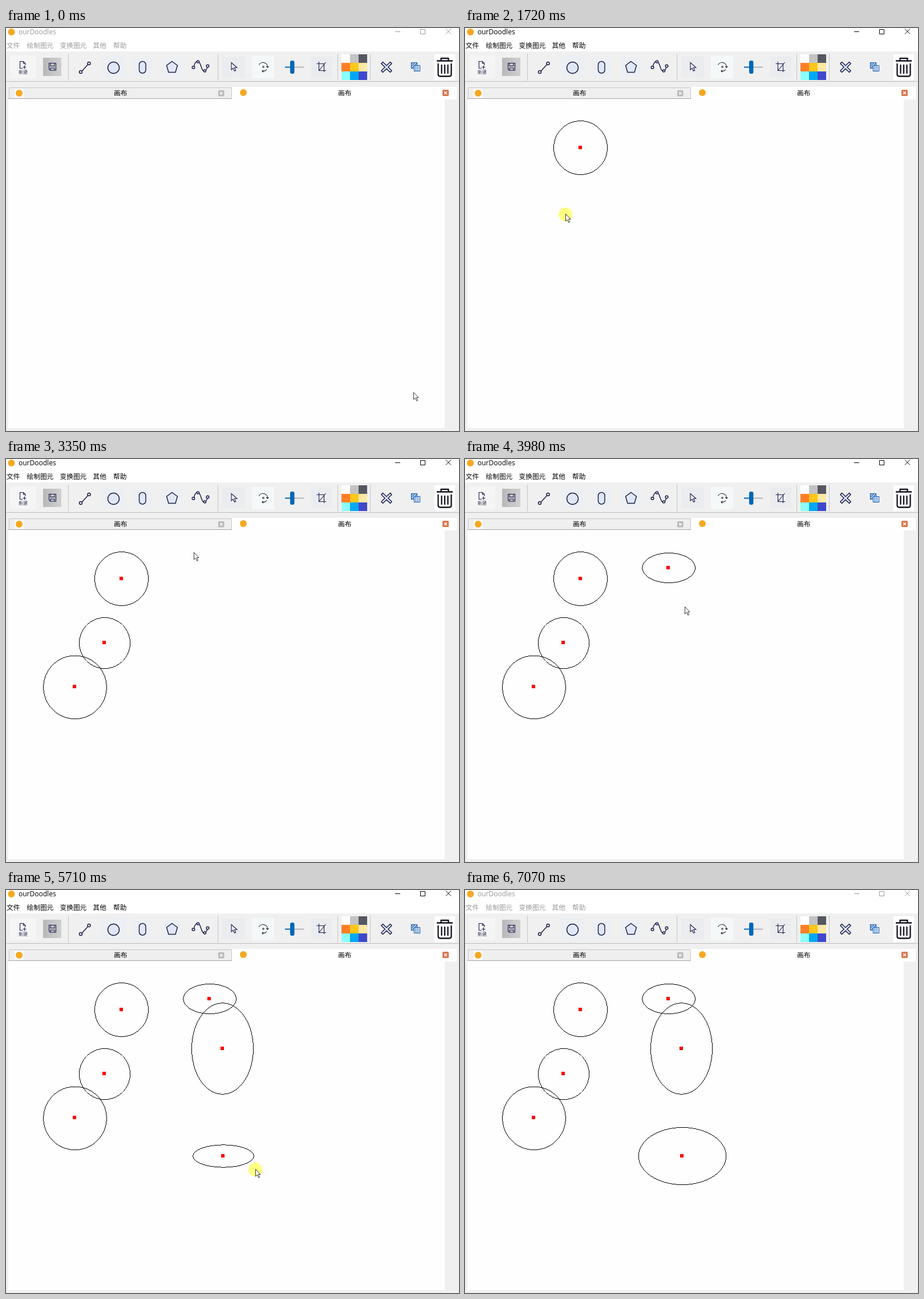
These frames come from a looping animation (794x705 px, 7.15 s). An HTML page:

```html
<!DOCTYPE html>
<html lang="zh">
<head>
<meta charset="utf-8">
<title>ourDoodles</title>
<style>
html, body { margin: 0; width: 100%; height: 100%; overflow: hidden; background: #f0f0f0; }
svg { display: block; }
text { font: 11.7px "Noto Sans CJK SC", "Noto Sans CJK", sans-serif; }
.name { font: 12px "Open Sans", sans-serif; }
#bar { color: #999; fill: currentColor; }
#bar.on { color: #000; }
.logo { fill: #f6a821; }
.ink { fill: none; stroke: #1d1f4e; stroke-width: 1.5; }
.soft { fill: #e0e8f8; }
.thin { stroke-width: 1.1; }
#art, #palette { shape-rendering: crispEdges; }
#art rect { fill: #f00; }
#hover { fill: #d8e6f2; stroke: #c0dcf3; }
</style>
</head>
<body>
<svg width="794" height="705" viewBox="0 0 794 705">
  <defs>
    <linearGradient id="steel"><stop stop-color="#b8b8ba"/><stop offset="1" stop-color="#d0d0d2"/></linearGradient>
    <pattern id="hatch" width="3" height="3" patternUnits="userSpaceOnUse" patternTransform="rotate(45)">
      <path d="M.8 0V3" stroke="#1f63b5" stroke-width="1.5"/>
    </pattern>
  </defs>
  <path d="M0 0H794V41H0Z" fill="#fff"/>

  <g id="bar">
    <text class="name" x="22" y="11">ourDoodles</text>
    <text x="1" y="35">文件</text>
    <text x="36.5" y="35">绘制图元</text>
    <text x="94.5" y="35">变换图元</text>
    <text x="152.5" y="35">其他</text>
    <text x="188" y="35">帮助</text>
    <g fill="none" stroke="currentColor">
      <path d="M682 6.5h9M726.5 2.5h8v8h-8Z"/>
      <path d="M771 1.5l9 9M780 1.5l-9 9"/>
    </g>
  </g>
  <circle class="logo" cx="9.5" cy="7" r="6"/>

  <path d="M0 93.5H794" stroke="#bcbcbc"/>
  <path d="M109.5 45V92M371.5 45V92M581.5 45V92M638.5 45V92" stroke="#c4c4c4"/>
  <rect id="hover" y="43.5" width="50" height="49"/>
  <path d="M7 48h46v40H7Z" fill="#f5f5f5"/>
  <path d="M65 52h32v32H65Z" fill="url(#steel)"/>
  <path d="M168 49h42v38h-42ZM222 52h34v34h-34ZM274 52h34v34h-34Z" fill="#ecf0f4"/>
  <path d="M379 50h40v36h-40ZM535 50h37v36h-37Z" fill="#ebecef"/>
  <path d="M431 49h39v39h-39Z" fill="#f5f8f8"/>
  <path d="M751 46h36v45h-36Z" fill="#fff"/>

  <g class="ink thin">
    <path d="M29 70.5h-4.500V58.5h6l3.500 3.500v3M30.5 58.500V62H34M29.500 68.500h6M32.500 65.500v6"/>
    <path d="M75.500 61.500h12v12.500h-10l-2-2ZM78 61.500v5h7v-5M78 74v-4h7v4"/>
  </g>
  <text x="22" y="80" style="font-size:8px" fill="#34365c">新建</text>
  <g class="ink">
    <path d="M133 75.500L143.500 64"/>
    <circle cx="131" cy="77" r="2.500"/><circle cx="145.500" cy="62" r="2.500"/>
    <circle class="soft" cx="188.500" cy="69.500" r="10"/>
    <rect class="soft" x="233.500" y="58.500" width="11.500" height="20.500" rx="5.500"/>
    <path class="soft" d="M291 58.500L300.500 65.500L297 77.500H285L281.500 65.500Z"/>
    <path d="M329.500 66.500C331 60 334 57.500 337 58.500C342 60 342 75 347 75.500C351 76 352 71 353 68"/>
    <g class="soft"><circle cx="328.500" cy="69" r="2.300"/><circle cx="336.500" cy="59" r="2"/><circle cx="348.500" cy="75" r="2"/><circle cx="353.500" cy="66.500" r="2.300"/></g>
  </g>
  <path class="ink thin" d="M395 60.500V73l3.200-2.700 2.300 5 2.300-1-2.300-5H405Z"/>
  <g fill="none" stroke="#22242e" stroke-width="1.100">
    <path d="M443.500 64.500A8 8 0 0 1 458.500 69M456.300 67l2.200 2.200 2-2.200M457 72.500A8 8 0 0 1 449 75.500M451 73.500l-2 2 2 1.800"/>
    <circle cx="451" cy="68" r="1.200"/>
  </g>
  <path d="M505 68.500H522" stroke="#b4b4b4" stroke-width="2"/>
  <path d="M489 68.500H500" stroke="#0067b8" stroke-width="2"/>
  <rect x="498" y="57" width="7.500" height="23" rx="3" fill="#0067b8"/>
  <path class="ink thin" d="M548.500 59V74.500H561M544.500 62.500H557.500V77M548.500 74.500L560.500 60"/>
  <g id="palette"></g>
  <path class="ink soft" stroke-linejoin="round" d="M660.500 59.500L667 65.800L673.500 59.500L676.200 62.200L669.800 68.500L676.200 74.800L673.500 77.500L667 71.200L660.500 77.500L657.800 74.800L664.200 68.500L657.800 62.200Z"/>
  <g stroke="#1f63b5" stroke-width="1.200">
    <path d="M710.500 60.500h10v10h-10Z" fill="url(#hatch)"/>
    <path d="M715.500 65.500h10v10h-10Z" fill="#eef3fa"/>
    <path d="M718.500 65.500v10M722 65.500v10" fill="none"/>
  </g>
  <g fill="none" stroke="#14121c" stroke-width="2.300" stroke-linejoin="round">
    <path d="M755 57.500H783M762.500 57V53h13v4M757.500 62V81q0 3.500 3.500 3.500h16q3.500 0 3.500-3.500V62"/>
    <path d="M763.500 65V79M769 65V79M774.500 65V79" stroke-linecap="round"/>
  </g>

  <path d="M5.500 123.500V104.500H395.500V123.500" fill="#efefef" stroke="#c6c6c6"/>
  <path d="M396 103H790V125H396Z" fill="#fff"/>
  <path d="M4 124H769V700H4Z" fill="#fefefe"/>
  <path d="M4 123.500H396" stroke="#a5a5a5"/>
  <path d="M15 106h16v16H15Z" fill="#fafafa"/>
  <circle class="logo" cx="23" cy="114" r="6"/>
  <circle class="logo" cx="416" cy="113" r="6"/>
  <text x="189" y="118">画布</text>
  <text x="582" y="117.500">画布</text>
  <rect x="372" y="109" width="10.500" height="10.500" rx="1.500" fill="#b7b9b8"/>
  <rect x="765" y="108" width="11" height="11" rx="1.500" fill="#d9764f"/>
  <path d="M375 112l4.500 4.500m0-4.500l-4.500 4.500M768.200 111.200l4.600 4.600m0-4.600l-4.600 4.600" stroke="#fff" stroke-width="1.500"/>

  <g id="art"></g>
  <g id="mouse">
    <circle id="press" cy="1" r="12" fill="#ffff80"/>
    <path d="M.5 .5V13L3.400 10.300L5.700 15.300L7.600 14.400L5.400 9.500H9Z" fill="#fff" stroke="#222" stroke-width=".9"/>
  </g>
</svg>
<script>
const LOOP = 7150, STEP = 78, LEAD = 30;
const $ = id => document.getElementById(id);

function add(parent, tag, attrs) {
  const el = document.createElementNS('http://www.w3.org/2000/svg', tag);
  for (const k in attrs) el.setAttribute(k, attrs[k]);
  return parent.appendChild(el);
}

['#fff', '#c3c3c3', '#555861', '#ff7f27', '#ffc61a', '#fde8a6', '#8cfffb', '#00a8f3', '#3f48cc'].forEach((fill, i) => {
  add($('palette'), 'rect', { x: 587.5 + i % 3 * 15.2, y: 46 + (i / 3 | 0) * 15, width: 15.2, height: 15, fill });
});

function ease(t, from, to) {
  const p = Math.min(1, Math.max(0, (t - from) / (to - from)));
  return p * p * (3 - 2 * p);
}

// The pointer waits at one place
const rest = (x, y, from, to) => ({ from, to, at: () => [x, y] });

// The pointer pulls an ellipse out of its centre; bend > 1 widens it first
function pull(cx, cy, rx, ry, from, end, to, bend = 1) {
  const g = add($('art'), 'g');
  const line = add(g, 'path');
  add(g, 'rect', { x: Math.floor(cx) - 3, y: Math.floor(cy) - 3, width: 6, height: 6 });
  const reach = rx === ry ? Math.SQRT1_2 : 1;
  const radii = t => {
    const e = ease(t, from, end);
    return [rx * e ** (1 / bend), ry * e ** bend];
  };
  return {
    from, to, press: true,
    at(t) {
      const [w, h] = radii(t);
      return [cx + w * reach - 1, cy + h * reach - 1];
    },
    draw(t) {
      show(g, t >= from);
      line.setAttribute('d', outline(cx, cy, ...radii(t)));
    }
  };
}

// One-pixel outline: columns where the curve is flat, rows where it is steep
function outline(cx, cy, rx, ry) {
  if (rx < 1 || ry < 1) return '';
  let d = '';
  const dot = (x, y) => d += `M${Math.round(x)} ${Math.round(y)}h1v1h-1z`;
  const sweep = (c, r, other, plot) => {
    const span = r * r / Math.hypot(r, other);
    for (let p = Math.ceil(c - span); p <= c + span; p++) {
      const q = other * Math.sqrt(1 - ((p - c) / r) ** 2);
      plot(p, -q);
      plot(p, q);
    }
  };
  sweep(cx, rx, ry, (x, q) => dot(x, cy + q));
  sweep(cy, ry, rx, (y, q) => dot(cx + q, y));
  return d;
}

const pick = rest(203, 76, 690, 890);
const acts = [
  rest(714, 637, 0, 40),
  pick,
  pull(202, 209, 47, 47, 1150, 1390, 1420),
  pull(172.5, 321.5, 44.5, 44.5, 1710, 1870, 1890),
  pull(120.5, 398.8, 55.3, 55.3, 2025, 2260, 2340),
  rest(340, 131, 2650, 2730),
  rest(6, 27, 2960, 2990),
  rest(238, 75, 3200, 3280),
  pull(356.7, 190, 46.3, 26, 3430, 3740, 3750),
  pull(379, 277, 54, 79.7, 4150, 4600, 5000, 0.6),
  pull(380.5, 465, 76.7, 50, 5350, 5990, 6230, 1.6),
  rest(760, 672, 6610, LOOP)
];

function pointer(t) {
  const i = acts.findIndex(a => t < a.to);
  const next = acts[Math.max(i, 0)];
  if (t >= next.from) return next.at(t);
  const prev = acts[i - 1];
  const e = ease(t, prev.to, next.from);
  const goal = next.at(next.from);
  return prev.at(prev.to).map((v, k) => v + (goal[k] - v) * e);
}

const show = (el, on) => el.setAttribute('visibility', on ? 'visible' : 'hidden');

function draw(ms) {
  const now = Math.floor((ms + 18) / STEP) * STEP;
  const t = Math.min(now + LEAD, LOOP - 1);
  const [x, y] = pointer(t);
  const seen = ms < 2730 || (ms >= 2960 && ms < 6690);
  const pressed = acts.some(a => a.press && t >= a.from && t < a.to) || (ms >= pick.from && ms < 840);
  const button = Math.floor((x - 164) / 51);

  $('bar').classList.toggle('on', ms >= 690 && ms < 7070);
  $('mouse').setAttribute('transform', `translate(${Math.round(x)} ${Math.round(y)})`);
  show($('mouse'), seen);
  show($('press'), seen && pressed);
  $('hover').setAttribute('x', 164.5 + button * 51);
  show($('hover'), seen && y > 43 && y < 93 && (button === 0 || button === 1));
  for (const a of acts) if (a.draw) a.draw(now);
}

const start = performance.now();
function tick() {
  draw((performance.now() - start) % LOOP);
  requestAnimationFrame(tick);
}
tick();
</script>
</body>
</html>
```
